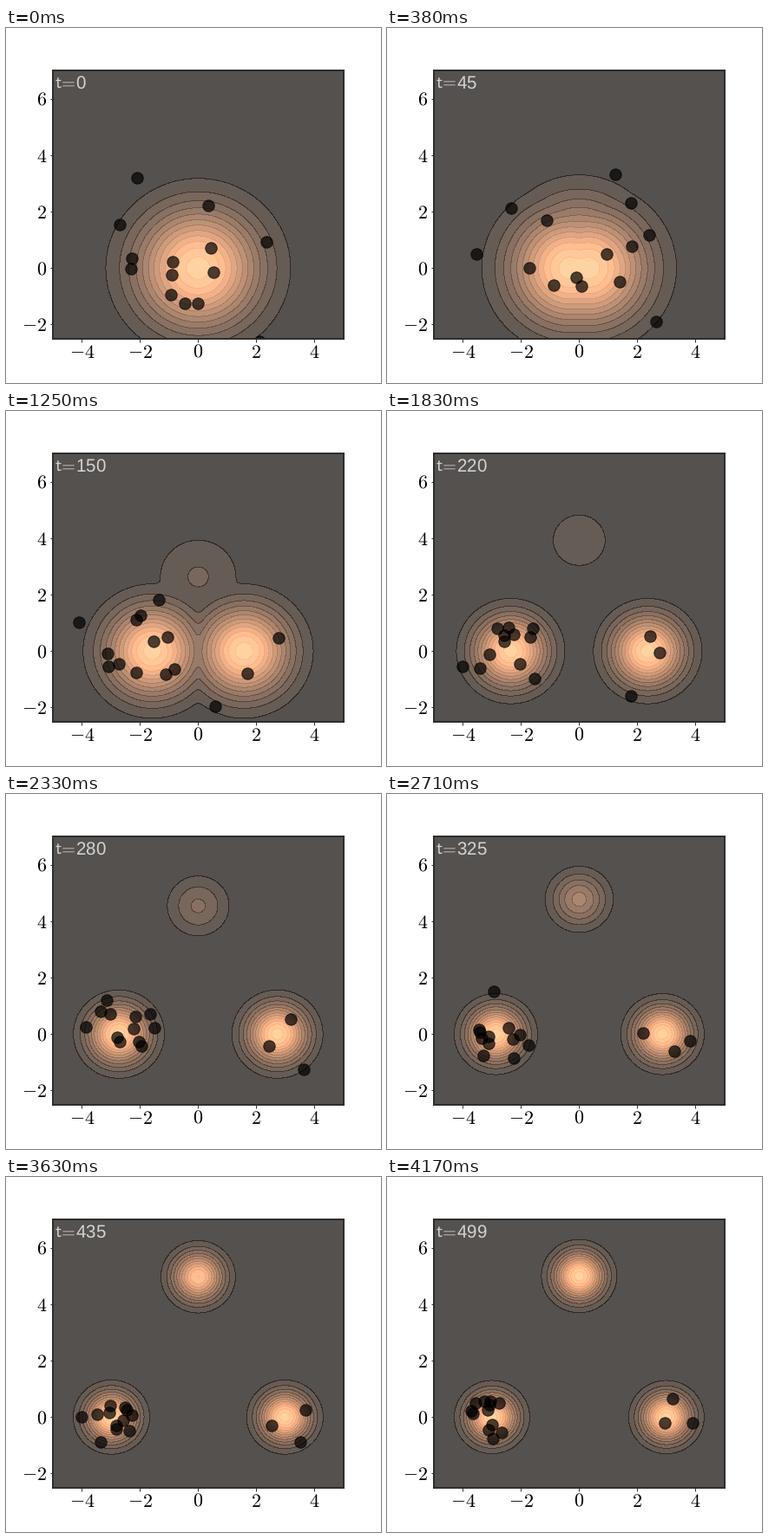
Animation, 432 px wide and 410 px high, one loop 4.21 s. Source, as a matplotlib script:

```python
import numpy as np
import matplotlib.pyplot as plt
from matplotlib.animation import FuncAnimation

plt.rcParams.update({"mathtext.fontset": "cm", "text.hinting": "none",
                     "font.family": "Liberation Sans"})

LOOP_MS = 4210
STATES = 101
TICKS = 3  # animation frames per state
LAST_STEP = 499
ALPHA = 0.7
LEVELS = np.arange(14) * 0.08
CENTERS = np.array([(-3, 0), (3, 0), (0, 5)])
LEFT, RIGHT = 12, 3  # walkers ending in each of the lower modes

fig = plt.figure(figsize=(432 / 72, 410 / 72), dpi=72, facecolor="white")
ax = fig.add_axes([0.125, 0.125, 0.775, 0.755])
ax.set(xlim=(-5, 5), ylim=(-2.5, 7))


def label_axis(axis, ticks, pad):
    axis.set_ticks(ticks, [f"${v}$" for v in ticks])
    axis.set_tick_params(labelsize=22, length=3.5, width=0.8, pad=pad)


label_axis(ax.xaxis, range(-4, 5, 2), 2.5)
label_axis(ax.yaxis, range(-2, 7, 2), 3.5)
for spine in ax.spines.values():
    spine.set(linewidth=2, edgecolor="0.18")

X, Y = np.meshgrid(np.linspace(-5, 5, 180), np.linspace(-2.5, 7, 180))
log_base = -(X**2 + Y**2) / 4
log_target = np.logaddexp.reduce(
    [-1.5 * ((X - cx) ** 2 + (Y - cy) ** 2) for cx, cy in CENTERS])


def anneal(u):
    """Sigmoid ramp rescaled to run exactly from 0 to 1."""
    low = 1 / (1 + np.exp(4))
    return (1 / (1 + np.exp(-8 * (u - 0.5))) - low) / (1 - 2 * low)


def density(s):
    log_p = (1 - s) * log_base + s * log_target
    return np.exp(log_p - log_p.max())


def walker_noise(keep=0.95):
    """Stationary unit-variance random walk for every walker."""
    rng = np.random.default_rng(4)
    kicks = rng.normal(size=(STATES, LEFT + RIGHT, 2))
    z = kicks.copy()
    for n in range(1, STATES):
        z[n] = keep * z[n - 1] + np.sqrt(1 - keep**2) * kicks[n]
    return z


noise = walker_noise()
homes = np.repeat(CENTERS[:2], [LEFT, RIGHT], axis=0)


def walker_positions(n, s):
    """Walkers jitter around the annealed mode they belong to."""
    precision = 0.5 * (1 - s) + 3 * s
    return homes * 3 * s / precision + noise[n] / np.sqrt(precision)


walkers = ax.scatter(*homes.T, s=180, c="black", alpha=ALPHA, zorder=2.4)
clock = ax.text(-4.93, 6.38, "", fontsize=20.5, color="lightgray", zorder=4)
shown = {"state": None, "fill": None}


def draw(i):
    # Each state starts a third of its duration early.
    n = min((i + 1) // TICKS, STATES - 1)
    if n != shown["state"]:
        if shown["fill"]:
            shown["fill"].remove()
        t = min(5 * n, LAST_STEP)
        s = anneal(t / LAST_STEP)
        # Neighbouring translucent bands overlap by a pixel, which draws the rings.
        shown["fill"] = ax.contourf(X, Y, density(s), LEVELS, cmap="copper",
                                    alpha=ALPHA, antialiased=False, zorder=1)
        walkers.set_offsets(walker_positions(n, s))
        clock.set_text(rf"$\mathsf{{t}}\!=\!\mathregular{{{t}}}$")
        shown["state"] = n
    return [walkers, clock]


anim = FuncAnimation(fig, draw, frames=STATES * TICKS, init_func=lambda: [],
                     interval=LOOP_MS / (STATES * TICKS), repeat=True,
                     repeat_delay=0)
plt.show()
```
